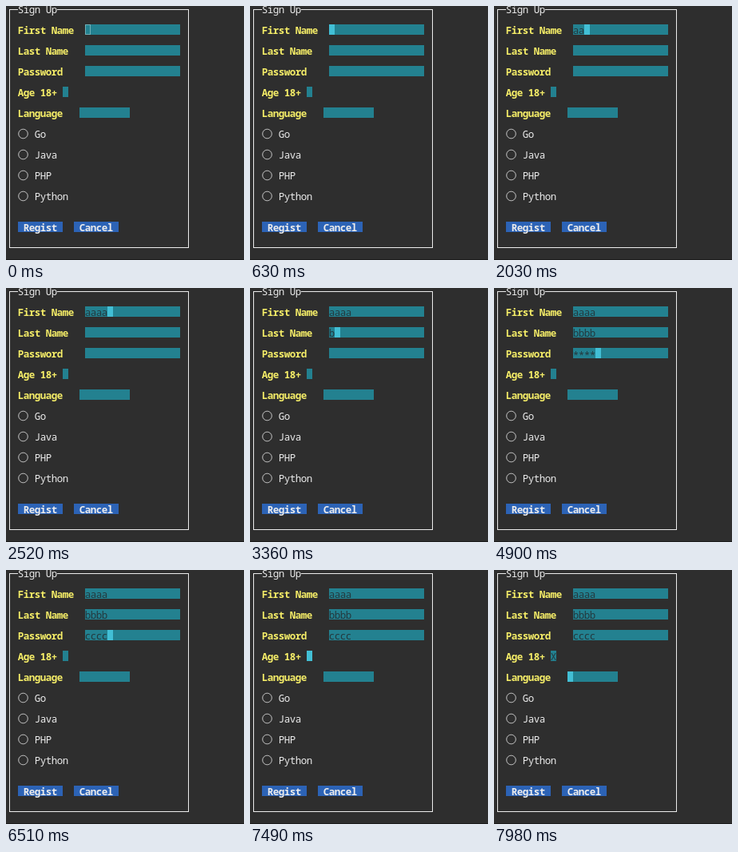
An HTML page with a canvas for the animation above (8000 ms loop, 298x318 px).

```html
<!DOCTYPE html>
<html lang="en">
<head>
<meta charset="utf-8">
<title>Sign Up</title>
<style>
  html, body { margin: 0; width: 100%; height: 100%; overflow: hidden; background: #2e2e2e; }
  canvas { display: block; }
</style>
</head>
<body>
<canvas id="stage" width="298" height="318"></canvas>
<script>
const ctx = document.getElementById('stage').getContext('2d');
const LOOP = 8000, CELL = 7, LINE = 13;
const BG = '#2e2e2e', WHITE = '#ececec', YELLOW = '#f6ee68',
      TEAL = '#238190', CURSOR = '#42bfd5', INK = '#24393e', BLUE = '#2c63b6';

// Positions are terminal cells: column and row.
const fields = [
  { label: 'First Name', col: 14, row: 2, size: 17 },
  { label: 'Last Name', col: 14, row: 4, size: 17 },
  { label: 'Password', col: 14, row: 6, size: 17 },
  { label: 'Age 18+', col: 10, row: 8, size: 1 },
  { label: 'Language', col: 13, row: 10, size: 9 }
];
const languages = ['Go', 'Java', 'PHP', 'Python'];

// Each entry: time in ms, focused field, its text from then on.
const actions = [
  [0, 0, ''], [1750, 0, 'a'], [2030, 0, 'aa'], [2240, 0, 'aaa'], [2520, 0, 'aaaa'],
  [3150, 1, ''], [3360, 1, 'b'], [3500, 1, 'bb'], [3640, 1, 'bbb'], [3850, 1, 'bbbb'],
  [3990, 2, ''], [4200, 2, '*'], [4340, 2, '**'], [4550, 2, '***'], [4760, 2, '****'],
  [5950, 2, 'cccc'],
  [6860, 3, ''], [7630, 3, 'X'],
  [7840, 4, '']
];
const WINDOW_FOCUS = 70;

const cellX = col => 1 + col * CELL;
const cellY = row => row * LINE - 3;

function fillCells(col, row, count, color) {
  ctx.fillStyle = color;
  ctx.fillRect(cellX(col), cellY(row), count * CELL, LINE);
}

function write(text, col, row, color, weight = 'normal') {
  ctx.font = `${weight} 12.5px "Noto Sans Mono", "DejaVu Sans Mono", monospace`;
  ctx.textAlign = 'center';
  ctx.fillStyle = color;
  [...text].forEach((char, i) => {
    const drop = char === '*' ? 2 : 0;
    ctx.fillText(char, cellX(col + i) + CELL / 2, cellY(row) + 12 + drop);
  });
}

function drawFrame() {
  ctx.fillStyle = BG;
  ctx.fillRect(0, 0, 298, 318);
  ctx.fillStyle = '#1c1c1c';
  ctx.fillRect(0, 317, 298, 1);
  ctx.strokeStyle = WHITE;
  ctx.lineWidth = 1;
  ctx.strokeRect(4.5, 4.5, 224, 298);
  ctx.fillStyle = BG;
  ctx.fillRect(cellX(2), 0, 7 * CELL, 11);
  write('Sign Up', 2, 0, WHITE);
}

function drawChoices() {
  languages.forEach((name, i) => {
    const row = 12 + i * 2;
    ctx.strokeStyle = '#d4d4d4';
    ctx.lineWidth = 0.9;
    ctx.beginPath();
    ctx.arc(21.5, cellY(row) + 7, 5.8, 0, Math.PI * 2);
    ctx.stroke();
    write(name, 5, row, WHITE);
  });
}

function drawButton(text, col) {
  fillCells(col, 21, 8, BLUE);
  write(text, col + 1, 21, WHITE, 'bold');
}

function drawFields(time) {
  const values = fields.map(() => '');
  let active = 0;
  for (const [at, index, text] of actions) {
    if (at > time) break;
    active = index;
    values[index] = text;
  }
  fields.forEach(({ label, col, row, size }, i) => {
    write(label, 2, row, YELLOW, 'bold');
    fillCells(col, row, size, TEAL);
    if (i === active) {
      const cursor = col + Math.min(values[i].length, size - 1);
      if (time >= WINDOW_FOCUS) {
        fillCells(cursor, row, 1, CURSOR);
      } else {
        ctx.strokeStyle = '#6fb0b8';
        ctx.lineWidth = 1;
        ctx.strokeRect(cellX(cursor) + 0.5, cellY(row) + 0.5, CELL - 1, LINE - 1);
      }
    }
    write(values[i], col, row, INK);
  });
}

function render(now) {
  drawFrame();
  drawFields(now % LOOP);
  drawChoices();
  drawButton('Regist', 2);
  drawButton('Cancel', 12);
}

const start = performance.now();
function tick() {
  render(performance.now() - start);
  requestAnimationFrame(tick);
}
tick();
</script>
</body>
</html>
```
